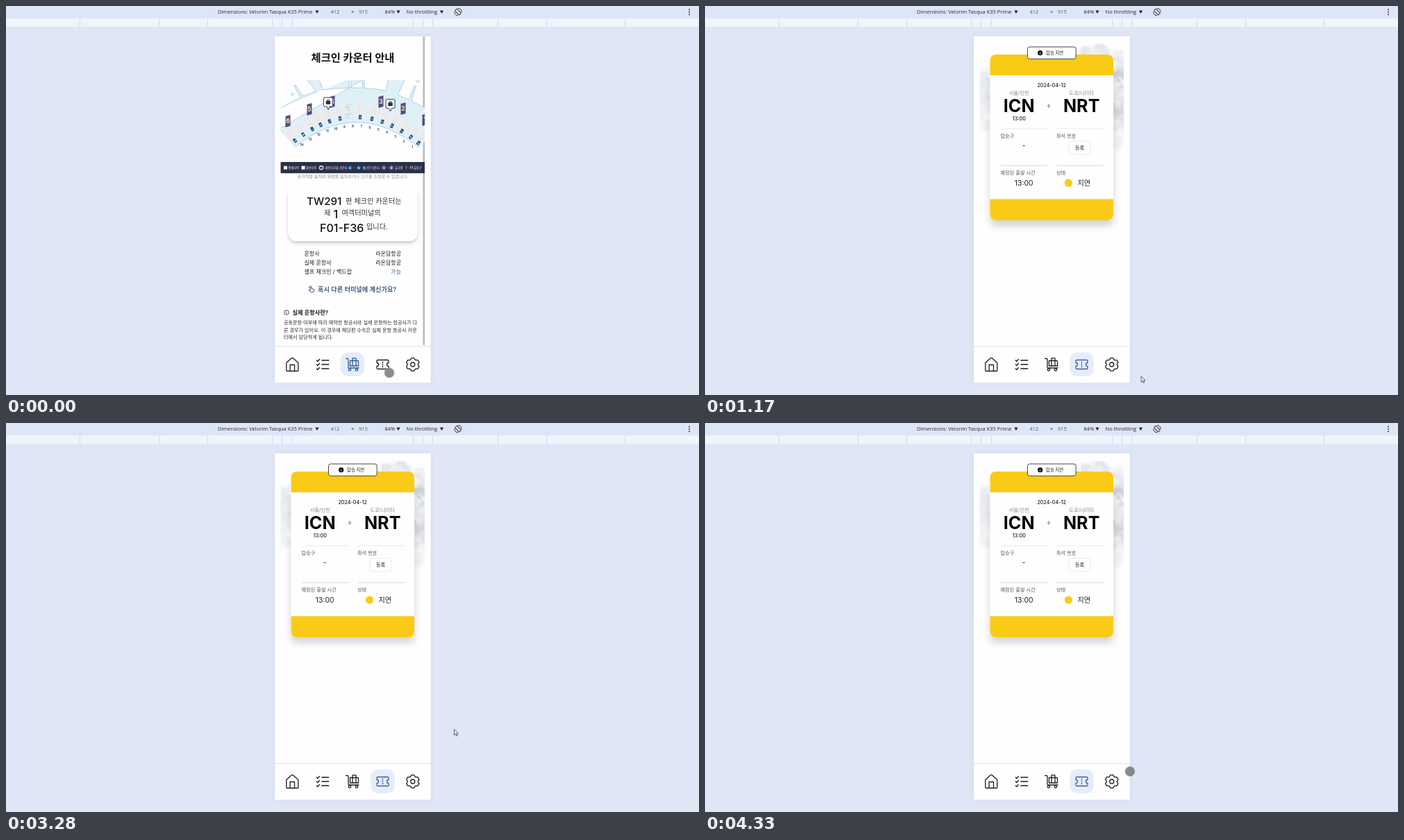
Animation, 998 px wide and 561 px high, one loop 4400 ms. Source, as an HTML page:

```html
<!DOCTYPE html>
<html lang="ko">
<head>
<meta charset="utf-8">
<title>Check-in app preview</title>
<style>
html, body { margin: 0; width: 100%; height: 100%; overflow: hidden; background: #dfe6f5; }
svg { display: block; width: 100vw; height: 100vh; }
text { font-family: Inter, "Noto Sans CJK KR", "Noto Sans CJK", sans-serif; white-space: pre; }
.bar text { font-family: "Open Sans", "Noto Sans", sans-serif; }
.icon { fill: none; stroke-width: 1.3; stroke-linecap: round; stroke-linejoin: round; }
</style>
</head>
<body>
<svg id="stage" viewBox="0 0 998 561" xmlns="http://www.w3.org/2000/svg"></svg>
<script>
const LOOP = 4400, OPEN_TICKET = 130, LOADED = 480;
const INK = '#1b1d22', BLUE = '#3f5f98', YELLOW = '#f9cb17';

const text = (x, y, size, str, { fill = INK, weight = 400, anchor = 'start' } = {}) =>
  `<text x="${x}" y="${y}" font-size="${size}" fill="${fill}" font-weight="${weight}" text-anchor="${anchor}">${str}</text>`;
const mid = (x, y, size, str, opts) => text(x, y, size, str, { ...opts, anchor: 'middle' });
const rect = (x, y, w, h, fill, extra = '') =>
  `<rect x="${x}" y="${y}" width="${w}" height="${h}" fill="${fill}" ${extra}/>`;
const circle = (x, y, r, fill, extra = '') => `<circle cx="${x}" cy="${y}" r="${r}" fill="${fill}" ${extra}/>`;
const path = (d, extra = '') => `<path d="${d}" ${extra}/>`;
const at = (x, y, body, turn = 0) => `<g transform="translate(${x} ${y}) rotate(${turn})">${body}</g>`;
const shadow = (id, dy, blur, opacity) =>
  `<filter id="${id}" x="-20%" y="-20%" width="140%" height="150%">
    <feDropShadow dx="0" dy="${dy}" stdDeviation="${blur}" flood-opacity="${opacity}"/></filter>`;

let seed = 7;
const random = () => (seed = (seed * 16807) % 2147483647) / 2147483647;

function toolbar() {
  const down = x => path(`M${x - 2.6} 6.5h5.2l-2.6 4.4z`, 'fill="#202124"');
  const ticks = [106, 220, 290, 383, 397, 412, 586, 600, 614, 708, 778, 891]
    .map(x => rect(x, 18, .9, 12, '#c9d9ef')).join('');
  const dots = [5.2, 8.7, 12.2].map(y => circle(984, y, 1, '#333')).join('');
  const rotate = at(651, 8.5, rect(-2.1, -4.4, 4.2, 8.8, 'none', 'rx=".7" transform="rotate(-45)"') +
    path('M-5.300 0A5.300 5.300 0 0 0 0 5.300M5.300 0A5.300 5.300 0 0 0 0-5.300'));
  const label = (x, str, fill = '#27292d') => text(x, 11.4, 7.5, str, { fill });
  return `<g class="bar">${rect(0, 0, 998, 18, '#dde6f7')}${rect(0, 18, 998, 12, '#f0f4fc')}${ticks}
    ${label(305, 'Dimensions: Velorim Tasqua K35 Prime')}${down(448)}
    ${label(467.5, '412', '#555b66')}${label(497, '×')}${label(508, '915', '#555b66')}
    ${label(545.5, '84%')}${down(565)}${label(576.5, 'No throttling')}${down(627.5)}
    <g fill="none" stroke="#333" stroke-width="1">${rotate}</g>${dots}</g>`;
}

function terminalMap() {
  const arc = (x, top) => top + .0045 * (x - 503) ** 2;
  const tilt = x => Math.atan(.009 * (x - 503)) * 57.3;
  const desks = [416, 428, 441, 453, 466, 481, 510, 527, 542, 556, 570, 583, 594];
  const counters = desks.map((x, i) => at(x, arc(x, 160),
    rect(-6.3, -20, 12, 19, '#ededed') + rect(-2.5, -17, .7, 12, '#dcdcdc') + rect(1.5, -17, .7, 12, '#dcdcdc') +
    rect(-2, -3, 4, 6.2, '#174f83') + mid(0, 1.6, 3.4, 'NMLKJHGFEDCBA'[i], { fill: '#fff', weight: 700 }), tilt(x))).join('');
  const exits = Array.from({ length: 14 }, (_, i) => {
    const x = 426 + i * 12.25;
    return mid(x, arc(x, 175), 4.5, 14 - i, { fill: '#26456d', weight: 700 });
  }).join('');
  const gates = [[406, 166, 6], [437, 149, 5], [470, 138, 4], [540, 138, 3], [572, 148, 2], [603, 164, 1]]
    .map(([x, y, n]) => at(x, y, path('M-3.5-7L3.5-9V7L-3.5 9Z', 'fill="#514c86"') +
      mid(0, 3, 8.5, n, { fill: '#fff0a0', weight: 700 }))).join('');
  const badge = (x, y) => at(x, y, `<path d="M-5-6.5H5Q6.5-6.5 6.5-5V5Q6.5 6.5 5 6.5H2L0 11L-2 6.5H-5Q-6.5 6.5-6.5 5V-5Q-6.5-6.5-5-6.5Z" fill="#fff" stroke="#333b50"/>
    ${rect(-3.3, -1.7, 6.6, 5, '#29304a', 'rx="1"')}<path d="M-1.3-1.7V-3.2H1.3V-1.7" fill="none" stroke="#29304a"/>`);
  const crowd = Array.from({ length: 16 }, () =>
    circle(488 + random() * 9, 139 + random() * 24, .8 + random(), '#d4dadd')).join('');
  const small = (x, str) => text(x, 234.9, 4.2, str, { fill: '#fff', weight: 500 });
  const dot = (x, str, fill) => circle(x, 233.2, 3.1, fill) + mid(x, 234.6, 3.8, str, { fill: '#fff', weight: 700 });
  return `<g clip-path="url(#mapClip)">
    <path d="M394 148L424 132L415 115L417 114L428 130L447 123L432 105H451L456 121Q474 118.500 494 118V105M497 105V118H513V105M516 105V118.500Q534 119.500 547 122L551 105H575L564 128L580 135L588 115L590 116L584 137L604 147V190L594 204Q505 132 417 203L394 177Z"
      fill="#dff0f7" stroke="#97bdd2" stroke-width=".7"/>
    <path d="M411 126h3v3h-3zM591 107h4v3h-4z" fill="none" stroke="#97bdd2" stroke-width=".7"/>
    ${counters}${crowd}${exits}${gates}${badge(464, 138.5)}${badge(553.5, 141)}</g>
    ${rect(395.5, 225, 207.5, 16.2, '#2a3048')}
    ${rect(400, 230.7, 5, 5, '#dceff7')}${small(406.5, '면세지역')}${rect(425.5, 230.7, 5, 5, '#fff')}${small(431.5, '일반지역')}
    ${circle(454, 233.2, 3.3, '#ddd')}${rect(452.3, 232, 3.4, 2.8, '#2a3048')}${small(459.5, '대형수하물 카운터')}
    ${dot(495.5, 'A', '#17609c')}${small(501.3, '-')}${dot(508, 'N', '#17609c')}${small(513.5, '체크인 카운터')}
    ${dot(544, '1', '#6a66a4')}${small(549, '-')}${dot(555, '6', '#6a66a4')}${small(560, '출국장')}${small(575.5, '1 - 14 출입구')}`;
}

function counterPage() {
  const row = (y, name, value, fill = INK) =>
    text(429.5, y, 8, name) + text(569, y, 8, value, { fill, anchor: 'end' });
  const big = (x, y, size, str) => text(x, y, size, str, { weight: 500, fill: '#111' });
  const body = (x, y, str) => text(x, y, 10.2, str, { fill: '#333' });
  return `${mid(499.5, 80, 15.3, '체크인 카운터 안내', { weight: 700, fill: '#111' })}
    ${mid(499.5, 247.6, 6.1, '손가락을 움직여 화면을 움직이거나 크기를 조정할 수 있습니다.', { fill: '#8b8b8b' })}
    ${rect(600.5, 44, 2.5, 445, '#b9b9b9')}${terminalMap()}
    ${rect(406.5, 261.5, 186, 77.5, '#fefefe', 'rx="12" filter="url(#soft)"')}
    ${big(433, 286.6, 15.2, 'TW291')}${body(489, 284.8, '편 체크인 카운터는')}
    ${body(458, 302, '제')}${big(471.5, 306, 16, '1')}${body(483.5, 302, '여객터미널의')}
    ${big(452, 325.8, 16, 'F01-F36')}${body(519, 321.5, '입니다.')}
    ${row(360, '운항사', '라온담항공')}${row(373, '실제 운항사', '라온담항공')}${row(386, '셀프 체크인 / 백드랍', '가능', '#326fa5')}
    ${at(440, 408, path('M-1.500 1.500V-3Q-.7-4.500 0-3V-.3L3 .3Q4.300.8 4 2.500L3 4.300H-1.500L-4 1.800Q-3.700.3-1.500 1.500M-3.700-1.500Q-3.500-4-1.500-4.300', 'class="icon" style="stroke-width:1" stroke="#415a7d"'))}
    ${text(449, 411.6, 9.2, '혹시 다른 터미널에 계신가요?', { fill: '#415a7d', weight: 600 })}
    ${circle(404, 442, 3.3, 'none', `stroke="${INK}" stroke-width=".8"`)}${mid(404, 443.9, 5, 'i', { weight: 600 })}
    ${text(412.5, 445, 8.2, '실제 운항사란?', { weight: 600 })}
    ${['공동운항 여부에 따라 예약한 항공사와 실제 운항하는 항공사가 다',
      '른 경우가 있어요. 이 경우에 해당편 수속은 실제 운항 항공사 카운',
      '터에서 담당하게 됩니다.'].map((line, i) => text(400, 458.8 + i * 10.8, 7.1, line, { fill: '#2c2c2c' })).join('')}`;
}

function clouds() {
  const puffs = (cx, cy, rx, ry, n, dark) => Array.from({ length: n }, () => {
    const a = random() * 6.283, d = Math.sqrt(random()), v = dark + random() * (252 - dark);
    return circle((cx + rx * d * Math.cos(a)).toFixed(1), (cy + ry * d * Math.sin(a)).toFixed(1),
      (3 + random() * 5).toFixed(1), `rgb(${v - 5 | 0},${v - 2 | 0},${v + 2 | 0})`, 'opacity=".55"');
  }).join('');
  return `<g clip-path="url(#cloudClip)"><g mask="url(#fade)"><g filter="url(#billow)">
    ${puffs(561, 80, 23, 20, 80, 214)}${puffs(538, 92, 24, 8, 20, 234)}${puffs(596, 140, 9, 75, 110, 196)}
    ${puffs(444, 92, 24, 12, 50, 220)}${puffs(402, 138, 9, 46, 45, 226)}</g></g></g>`;
}

function ticketPage() {
  const label = (x, y, str) => text(x, y, 7.2, str, { fill: '#555a60' });
  const line = (y, fill) => rect(425.5, y, 68, .9, fill) + rect(506, y, 68, .9, fill);
  const city = (x, name, code) =>
    mid(x, 127.7, 7.2, name, { fill: '#85888c' }) + mid(x, 153.4, 25.2, code, { weight: 700, fill: '#080808' });
  const info = x => circle(x, 67.7, 3.6, '#111') + mid(x, 69.8, 5, 'i', { fill: '#fff', weight: 700 });
  return `${clouds()}
    <path d="M410.500 100H588V300Q588 309 579 309H419.500Q410.500 309 410.500 300Z" fill="#fefefe" filter="url(#lift)"/>
    <g id="bands" fill="${YELLOW}"><path d="M410.500 100V79Q410.500 70 419.500 70H579Q588 70 588 79V100Z"/>
      <path d="M410.500 278.500V300Q410.500 309 419.500 309H579Q588 309 588 300V278.500Z"/></g>
    ${rect(464.5, 59, 69.7, 17.3, '#fff', 'rx="3" stroke="#333" stroke-width=".9"')}
    ${mid(499.2, 116.8, 7.2, '2024-04-12', { weight: 500 })}
    ${city(452.2, '서울/인천', 'ICN')}${city(542.2, '도쿄/나리타', 'NRT')}
    ${mid(452.3, 165, 7.3, '13:00', { weight: 500 })}
    ${at(495.2, 144, path('M-2.800-.5H-.8L-1.200-3H0L1-.6H2.200Q3.600 0 2.200.6H1L0 3H-1.200L-.8.5H-2.800Z', 'fill="#8da3a6"'))}
    ${line(176.6, '#e6e8eb')}${line(229.7, '#d3d4d6')}
    ${label(425.5, 189.5, '탑승구')}${label(506, 189.5, '좌석 번호')}
    ${mid(459.2, 205.4, 10.5, '-')}
    ${rect(524, 195, 31, 19, '#fff', 'rx="2" stroke="#e6e8eb" stroke-width=".9"')}${mid(539.5, 206.8, 7.1, '등록', { weight: 500 })}
    ${label(425.5, 242.5, '예정된 출발 시간')}${label(506, 242.5, '상태')}
    ${mid(459.2, 259, 10.4, '13:00')}
    <g id="waiting">${info(495)}${circle(532.5, 254.5, 5.5, 'none', `stroke="${INK}" stroke-width="1.3"`)}</g>
    <g id="delayed">${info(482.7)}${text(491, 69.9, 6.4, '탑승 지연', { weight: 500 })}
      ${circle(523.4, 255.2, 5.6, YELLOW)}${text(536.5, 259, 10.1, '지연')}</g>`;
}

function navigation() {
  const gear = Array.from({ length: 6 }, (_, k) => [[-11, 9.6], [11, 9.6], [30, 7.4]]
    .map(([a, r]) => {
      const angle = (k * 60 + a - 90) * Math.PI / 180;
      return `${(r * Math.cos(angle)).toFixed(1)} ${(r * Math.sin(angle)).toFixed(1)}`;
    }).join('L')).join('L');
  const checks = [-6, 0, 6].map(y => `M-8.500 ${y}l1.500 1.500 2.700-3M-1 ${y}H9`).join('');
  const icons = [
    [412.3, path('M-8.500-2.500L-1-9.300Q0-10 1-9.300L8.500-2.500V8.500Q8.500 9.500 7.500 9.500H-7.500Q-8.500 9.500-8.500 8.500ZM-3.200 9.500V.5H3.200V9.500')],
    [455.8, path(checks)],
    [499, path('M-9.300-8.500H-7Q-6-8.500-6-7.500V4Q-6 5-5 5H9M-3.500-5.500H7.500Q8.500-5.500 8.500-4.500V2H-3.500ZM0 2V-9.200H5V2') +
      circle(-4, 7.5, 1.7, 'none') + circle(6, 7.5, 1.7, 'none')],
    [542.5, path('M-7-6.500H7Q8.500-6.500 8.500-5V-2.500A2.500 2.500 0 0 0 8.500 2.500V5Q8.500 6.500 7 6.500H-7Q-8.500 6.500-8.500 5V2.500A2.500 2.500 0 0 0-8.500-2.500V-5Q-8.500-6.500-7-6.500ZM0-3.800V-2.500M0-.6V.6M0 2.500V3.800')],
    [585.8, path(`M${gear}Z`) + circle(0, 0, 3, 'none')]
  ];
  return rect(387, 490.5, 225, 1, '#dfe1e5') + rect(0, 499.5, 34.5, 34.5, '#e5edfb', 'id="active" rx="11"') +
    icons.map(([x, body], i) => `<g class="icon" id="nav${i}" stroke="${INK}">${at(x, 517, body)}</g>`).join('');
}

const stage = document.getElementById('stage');
stage.innerHTML = `<defs>
  <clipPath id="mapClip"><rect x="395.5" y="107" width="207.5" height="118"/></clipPath>
  <clipPath id="cloudClip"><rect x="395.5" y="48" width="207.5" height="184"/></clipPath>
  <linearGradient id="fall" x2="0" y2="1"><stop offset=".45" stop-color="#fff"/><stop offset="1"/></linearGradient>
  <mask id="fade" maskUnits="userSpaceOnUse" x="390" y="40" width="220" height="195"><rect x="390" y="40" width="220" height="195" fill="url(#fall)"/></mask>
  <filter id="billow">
    <feGaussianBlur stdDeviation="1.800" result="mist"/>
    <feTurbulence type="fractalNoise" baseFrequency=".09" numOctaves="3" seed="4"/>
    <feDisplacementMap in="mist" scale="12" xChannelSelector="R" yChannelSelector="G"/>
  </filter>
  ${shadow('soft', 3, 2.5, .2)}${shadow('lift', 8, 5.5, .17)}${shadow('halo', 0, 3, .07)}
  </defs>
  ${rect(0, 0, 998, 561, '#dfe6f5')}${toolbar()}
  ${rect(387, 43.7, 224.7, 499.6, '#fefefe', 'filter="url(#halo)"')}
  <g id="counter">${counterPage()}</g><g id="ticket">${ticketPage()}</g>${navigation()}
  <g id="touch">${circle(0, 0, 7, '#777', 'fill-opacity=".85" stroke="#aaa" stroke-opacity=".7"')}</g>
  <g id="arrow">${path('M0 0V8.300L1.900 6.600L3.200 9.600L4.600 9L3.300 6.100H5.800Z', 'fill="#fff" stroke="#333" stroke-width=".8"')}</g>`;

const el = id => document.getElementById(id);
const show = (id, on) => { el(id).style.display = on ? '' : 'none'; };

// time, x, y
const track = [
  [0, 552, 529], [130, 552, 529], [340, 570.5, 531.5], [620, 614, 538], [690, 620, 537], [1170, 628, 534],
  [1450, 683, 525], [1720, 681, 500], [1790, 655.5, 443.5], [1920, 655.5, 443.5], [2190, 650, 442],
  [3270, 650, 442], [3280, 645.5, 441.7], [3350, 645.5, 441.7], [3770, 600, 458], [3910, 579, 467.5],
  [4050, 580, 474], [4330, 612, 502.5], [4400, 612, 502.5]
];

function pointer(t) {
  const i = track.findIndex(p => p[0] > t);
  const [a, b] = [track[i - 1], track[i]];
  const k = (t - a[0]) / (b[0] - a[0]);
  return [a[1] + (b[1] - a[1]) * k, a[2] + (b[2] - a[2]) * k];
}

function draw(t) {
  const onTicket = t >= OPEN_TICKET, loaded = t >= LOADED;
  show('counter', !onTicket);
  show('ticket', onTicket);
  show('bands', loaded);
  show('delayed', loaded);
  show('waiting', !loaded);
  el('active').setAttribute('x', onTicket ? 525.3 : 481.7);
  el('nav2').setAttribute('stroke', onTicket ? INK : '#2f5f95');
  el('nav3').setAttribute('stroke', onTicket ? BLUE : INK);
  const [x, y] = pointer(t), inside = x < 616;
  show('touch', inside);
  show('arrow', !inside);
  el(inside ? 'touch' : 'arrow').setAttribute('transform', `translate(${x.toFixed(2)} ${y.toFixed(2)})`);
}

const start = performance.now();
function tick() {
  draw((performance.now() - start) % LOOP);
  requestAnimationFrame(tick);
}
tick();
</script>
</body>
</html>
```
